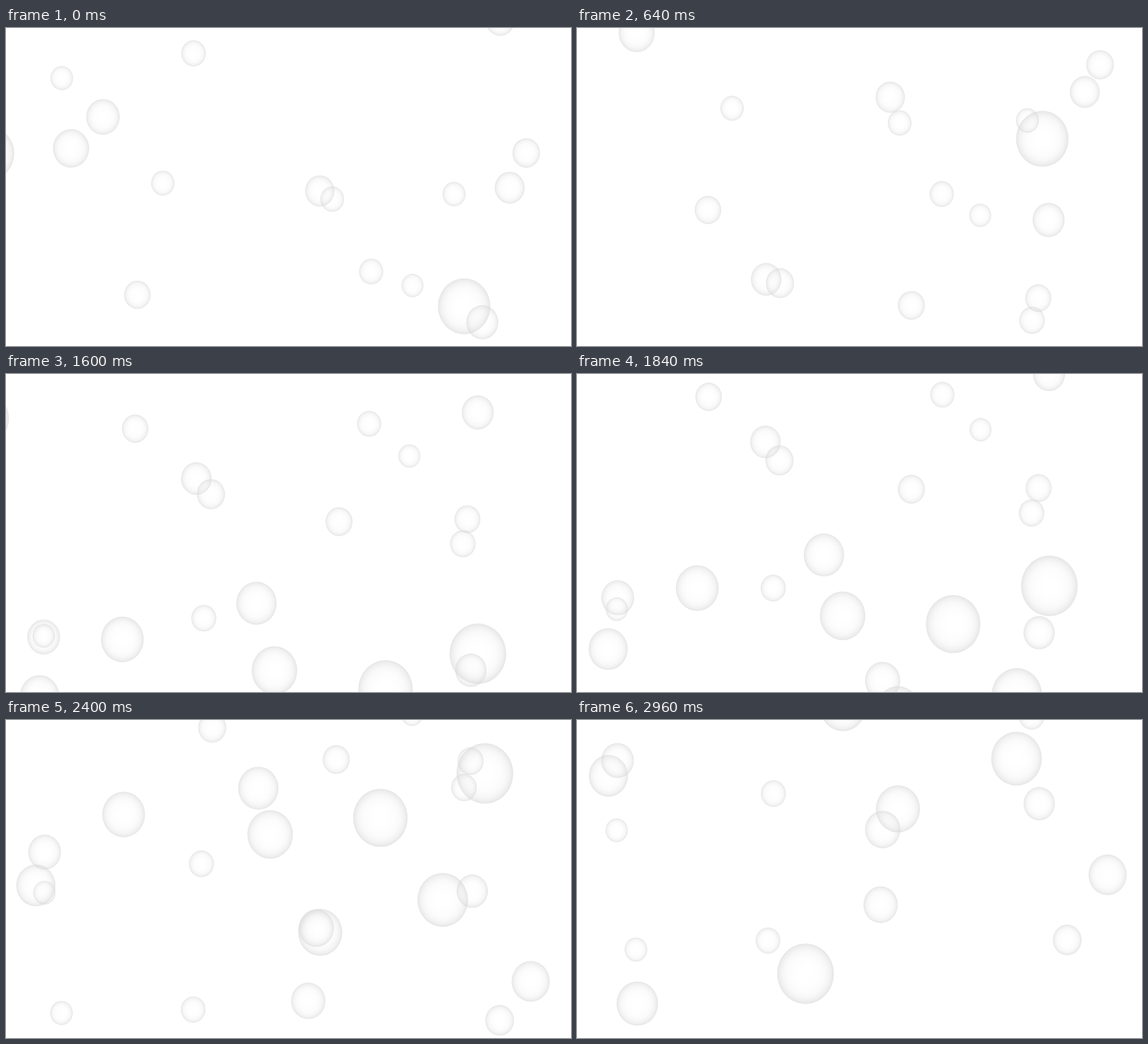
An HTML page with a canvas that plays this animation: 998 px wide and 561 px high, repeating every 3000 ms.

```html
<!DOCTYPE html>
<html lang="en">
<head>
<meta charset="utf-8">
<title>Rising bubbles</title>
<style>
  html, body { margin: 0; width: 100%; height: 100%; overflow: hidden; background: #fff; }
  canvas { display: block; width: 998px; height: 561px; }
</style>
</head>
<body>
<canvas id="stage"></canvas>
<script>
const W = 998, H = 561;
const LOOP = 3000, STEP = 40;
const CYCLE = 4545;        // ms until a bubble comes round again
const SWAY = CYCLE / 4;    // ms for one sideways swing
const SPEED = 0.00998;     // px per ms for each px of radius
const DRIFT = 0.154;       // swing relative to radius
const TALL = 1.065;        // height relative to width

// Far to near: [column x, ms when the bubble passes mid-height]
const passes = [
  [715, 898], [69, 2523], [101, -962], [794, 62], [276, -33], [573, 102],
  [644, 698], [334, -1085], [346, 2279], [806, 1684], [818, 1494], [231, 813],
  [587, 1516], [922, -247], [361, 1324], [869, -1160], [553, 27], [893, 5],
  [332, 1244], [820, 2478], [837, 846], [70, 2236], [175, -418], [535, 3110],
  [544, 2679], [110, -214], [-38, 2900], [932, 2938], [54, 2433], [441, 1949],
  [111, 3561], [210, 2098], [561, 2642], [468, 2204], [-38, 1113], [-35, -138],
  [774, 2483], [815, 456], [663, 2175], [410, 3295], [840, 2027]
];

// Depths are evenly spaced, so perspective sets the radius
const radiusAt = i => Math.min(50, 1235 / (63.7 - i));

const bubbles = passes.map(([x, time], i) => ({ x, time, r: radiusAt(i), phase: i / 5 }));

const canvas = document.getElementById("stage");
const ctx = canvas.getContext("2d");
const dpr = window.devicePixelRatio || 1;
canvas.width = Math.round(W * dpr);
canvas.height = Math.round(H * dpr);

// One unit-radius gradient serves every bubble
const shade = ctx.createRadialGradient(0, 0, 0, 0, 0, 1);
for (let k = 0; k <= 10; k++) {
  const d = k / 10;
  const alpha = 0.16 * d ** 2 + 0.48 * d ** 6;
  shade.addColorStop(d, `rgba(215,215,215,${alpha})`);
}

// Time since mid-height, wrapped to half a cycle either side
function ageAt(t, time) {
  const half = CYCLE / 2;
  return (t - time + half + CYCLE) % CYCLE - half;
}

function drawBubble({ x, time, r, phase }, t) {
  const cx = x + DRIFT * r * Math.cos(2 * Math.PI * (t / SWAY + phase));
  const cy = H / 2 - SPEED * r * ageAt(t, time);
  ctx.setTransform(dpr * r, 0, 0, dpr * r * TALL, dpr * cx, dpr * cy);
  ctx.beginPath();
  ctx.arc(0, 0, 1, 0, 2 * Math.PI);
  ctx.fill();
}

function draw(t) {
  ctx.setTransform(dpr, 0, 0, dpr, 0, 0);
  ctx.fillStyle = "#fff";
  ctx.fillRect(0, 0, W, H);
  ctx.fillStyle = shade;
  bubbles.forEach(bubble => drawBubble(bubble, t));
}

const start = performance.now();
function tick() {
  const t = (performance.now() - start) % LOOP;
  draw(Math.floor(t / STEP) * STEP);
  requestAnimationFrame(tick);
}
tick();
</script>
</body>
</html>
```
